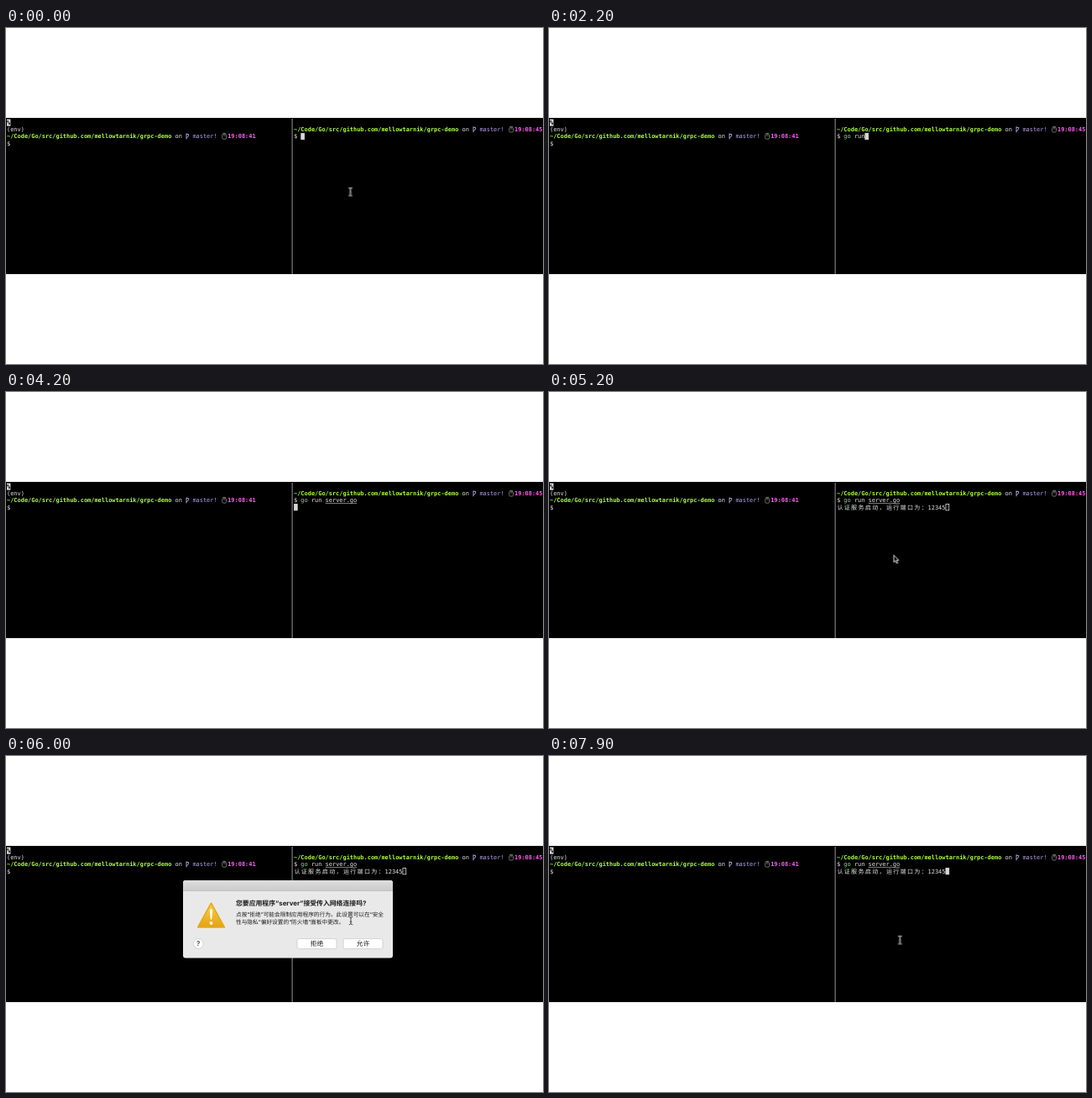
These frames come from a looping animation (640 px wide and 400 px high, 8000 ms). An HTML page:

```html
<!DOCTYPE html>
<html lang="zh-CN">
<head>
<meta charset="utf-8">
<title>Terminal demo</title>
<style>
html, body { margin: 0; width: 100%; height: 100%; overflow: hidden; background: #fff; }
svg { display: block; width: 640px; height: 400px; }
text { text-rendering: geometricPrecision; white-space: pre; }
.mono { font: 6.94px "DejaVu Sans Mono", monospace; fill: #e8e8e8; }
.cjk { font-family: "Noto Sans CJK SC", "Noto Sans CJK", sans-serif; font-size: 7px; letter-spacing: 1.356px; }
.path { fill: #aaff3c; font-weight: bold; }
.branch { fill: #b6a2f4; }
.time { fill: #ff5cf0; font-weight: bold; }
.cmd { fill: #92dc92; }
.ui { font-family: Inter, "Noto Sans CJK SC", "Noto Sans CJK", sans-serif; font-size: 6.7px; fill: #1c1c1c; }
.title { font-size: 7.85px; font-weight: bold; }
.mid { text-anchor: middle; }

.caret, .output, .block, .dialog, .pressed, .beam, .arrow { animation: 8s step-end infinite; }
.caret { animation-name: caret; }
.output { animation-name: output; }
.block { animation-name: block; }
.dialog { animation-name: dialog; }
.pressed { animation-name: pressed; }
.beam { animation-name: beam; }
.arrow { animation-name: arrow; }
.mouse { animation: mouse 8s ease-in-out infinite; }

/* column and row of the caret, one cell is 4.178 by 8.15 */
.caret { transform: translate(calc(343px + var(--c) * 4.178px), calc(108.6px + var(--r) * 8.15px)); }
@keyframes caret {
  0% { --c: 2; --r: 2; }
  13.75% { --c: 3; --r: 2; }
  15% { --c: 4; --r: 2; }
  16.25% { --c: 5; --r: 2; }
  18.75% { --c: 6; --r: 2; }
  20% { --c: 8; --r: 2; }
  33.75% { --c: 9; --r: 2; }
  35% { --c: 10; --r: 2; }
  36.25% { --c: 11; --r: 2; }
  37.5% { --c: 12; --r: 2; }
  40% { --c: 18; --r: 2; }
  43.75% { --c: 0; --r: 3; }
  63.75%, 100% { --c: 31; --r: 3; }
}
@keyframes output { 0% { opacity: 0; } 63.75%, 100% { opacity: 1; } }
@keyframes block { 0% { fill: #d8d8d8; } 65% { fill: #000; } 87.5%, 100% { fill: #d8d8d8; } }
@keyframes dialog { 0% { opacity: 0; } 66.25% { opacity: 1; } 87.5%, 100% { opacity: 0; } }
@keyframes pressed { 0% { opacity: 0; } 83.75% { opacity: 1; } 87.5%, 100% { opacity: 0; } }
@keyframes beam {
  0% { opacity: 1; } 13.75% { opacity: 0; } 70% { opacity: 1; }
  77% { opacity: 0; } 90%, 100% { opacity: 1; }
}
@keyframes arrow {
  0% { opacity: 0; } 65% { opacity: 1; } 70% { opacity: 0; }
  77% { opacity: 1; } 90%, 100% { opacity: 0; }
}
@keyframes mouse {
  0%, 71% { transform: translate(410.5px, 194.7px); }
  73%, 75% { transform: translate(411px, 196px); }
  79%, 100% { transform: translate(418.3px, 218.8px); }
}
</style>
</head>
<body>
<svg viewBox="0 0 640 400">
  <defs>
    <linearGradient id="bar" x2="0" y2="1">
      <stop stop-color="#dedede"/><stop offset="1" stop-color="#cacaca"/>
    </linearGradient>
    <linearGradient id="amber" x2="0" y2="1">
      <stop stop-color="#f7d34a"/><stop offset="1" stop-color="#e5a213"/>
    </linearGradient>
    <g id="prompt">
      <text class="mono path">~/Code/Go/src/github.com/mellowtarnik/grpc-demo</text>
      <text class="mono" x="200.5">on</text>
      <path d="M214 -5.9V1M214 -4.9H216.6V-2.6L214 -.6" fill="none" stroke="#aaa0e0" stroke-width="1"/>
      <text class="mono branch" x="221.4">master!</text>
      <g fill="none" stroke="#8c8584" stroke-width=".8">
        <rect x="256.7" y="-5" width="4.8" height="5.8" rx="1.5"/>
        <path d="M257.3 -6H261M258 -3.4H260.3"/>
      </g>
    </g>
  </defs>

  <rect y="107" width="640" height="186"/>
  <rect x="340.6" y="108" width="1" height="185" fill="#969696"/>

  <rect x="1" y="108.6" width="4.4" height="8.1" fill="#d8d8d8"/>
  <text class="mono" x="1" y="115.1" style="fill:#000;font-weight:bold">%</text>
  <text class="mono" x="1" y="123.3">(env)</text>
  <use href="#prompt" x="1" y="131.4"/>
  <text class="mono time" x="264.2" y="131.4">19:08:41</text>
  <text class="mono" x="1" y="139.6">$</text>

  <use href="#prompt" x="343" y="123.3"/>
  <text class="mono time" x="606" y="123.3">19:08:45</text>
  <text class="mono" x="343" y="131.4">$ <tspan class="cmd">go</tspan> run server.go</text>
  <rect x="380.6" y="132.1" width="37.6" height=".6" fill="#d0d0d0"/>
  <g class="output">
    <text class="mono cjk" x="343.4" y="139.9">认证服务启动，运行端口为：</text>
    <text class="mono" x="451.6" y="139.6">12345</text>
  </g>
  <!-- the black strip hides what is not typed yet -->
  <g class="caret">
    <rect width="300" height="8.4"/>
    <rect class="block" x=".4" y=".4" width="3.8" height="7.4" stroke="#d8d8d8" stroke-width=".8"/>
  </g>

  <g class="dialog">
    <rect x="211" y="148" width="250" height="92.5" rx="3" fill="#e9e9e9"/>
    <path d="M211 160.5V151a3 3 0 0 1 3-3H458a3 3 0 0 1 3 3V160.5Z" fill="url(#bar)"/>
    <rect x="211" y="160.3" width="250" height=".6" fill="#b4b4b4"/>
    <path d="M244.5 175L260.5 204H228.5Z" fill="url(#amber)" stroke="#f8f4e4" stroke-width="3" stroke-linejoin="round"/>
    <path d="M244.5 175L260.5 204H228.5Z" fill="url(#amber)" stroke="#e3aa22" stroke-width="1.6" stroke-linejoin="round"/>
    <path d="M242.9 183.5a1.6 1.6 0 0 1 3.2 0L245.3 194.5H243.7Z" fill="#fff"/>
    <circle cx="244.5" cy="199" r="1.9" fill="#fff"/>
    <text class="ui title" x="274" y="178.2">您要应用程序“server”接受传入网络连接吗?</text>
    <text class="ui" x="274" y="191">点按“拒绝”可能会限制应用程序的行为。此设置可以在“安全</text>
    <text class="ui" x="274" y="199.6">性与隐私”偏好设置的“防火墙”面板中更改。</text>
    <circle cx="229.2" cy="223.4" r="5.9" fill="#fff" stroke="#bdbdbd" stroke-width=".6"/>
    <text class="ui mid" x="229.2" y="226.3" style="font-size:8px;font-weight:500">?</text>
    <g fill="#fff" stroke="#bebebe" stroke-width=".6">
      <rect x="347" y="217.6" width="47" height="12" rx="2.4"/>
      <rect x="402" y="217.6" width="47" height="12" rx="2.4"/>
    </g>
    <text class="ui mid" x="370.5" y="226.4" style="font-size:7.8px">拒绝</text>
    <text class="ui mid" x="425.5" y="226.4" style="font-size:7.8px">允许</text>
  </g>
  <g class="pressed">
    <rect x="401.7" y="217.3" width="47.6" height="12.6" rx="2.6" fill="#2560d8"/>
    <text class="ui mid" x="425.5" y="226.4" style="font-size:7.8px;fill:#fff">允许</text>
  </g>

  <g class="mouse">
    <g class="beam" fill="none">
      <path id="ibeam" d="M-2.2 -4.3Q0 -4.3 0 -2.8Q0 -4.3 2.2 -4.3M0 -2.8V3.2M-2.2 4.7Q0 4.7 0 3.2Q0 4.7 2.2 4.7M-1.3 1.2H1.3" stroke="#e4e4e4" stroke-width="1.7"/>
      <use href="#ibeam" style="display:none"/>
      <path d="M-2.2 -4.3Q0 -4.3 0 -2.8Q0 -4.3 2.2 -4.3M0 -2.8V3.2M-2.2 4.7Q0 4.7 0 3.2Q0 4.7 2.2 4.7M-1.3 1.2H1.3" stroke="#181818" stroke-width=".7"/>
    </g>
    <path class="arrow" d="M.4 -.6V7.8L2.3 6.1L3.7 9.2L5.2 8.5L3.8 5.5H6.3Z" fill="#0a0a0a" stroke="#f2f2f2" stroke-width=".9" stroke-linejoin="round"/>
  </g>
</svg>
</body>
</html>
```
